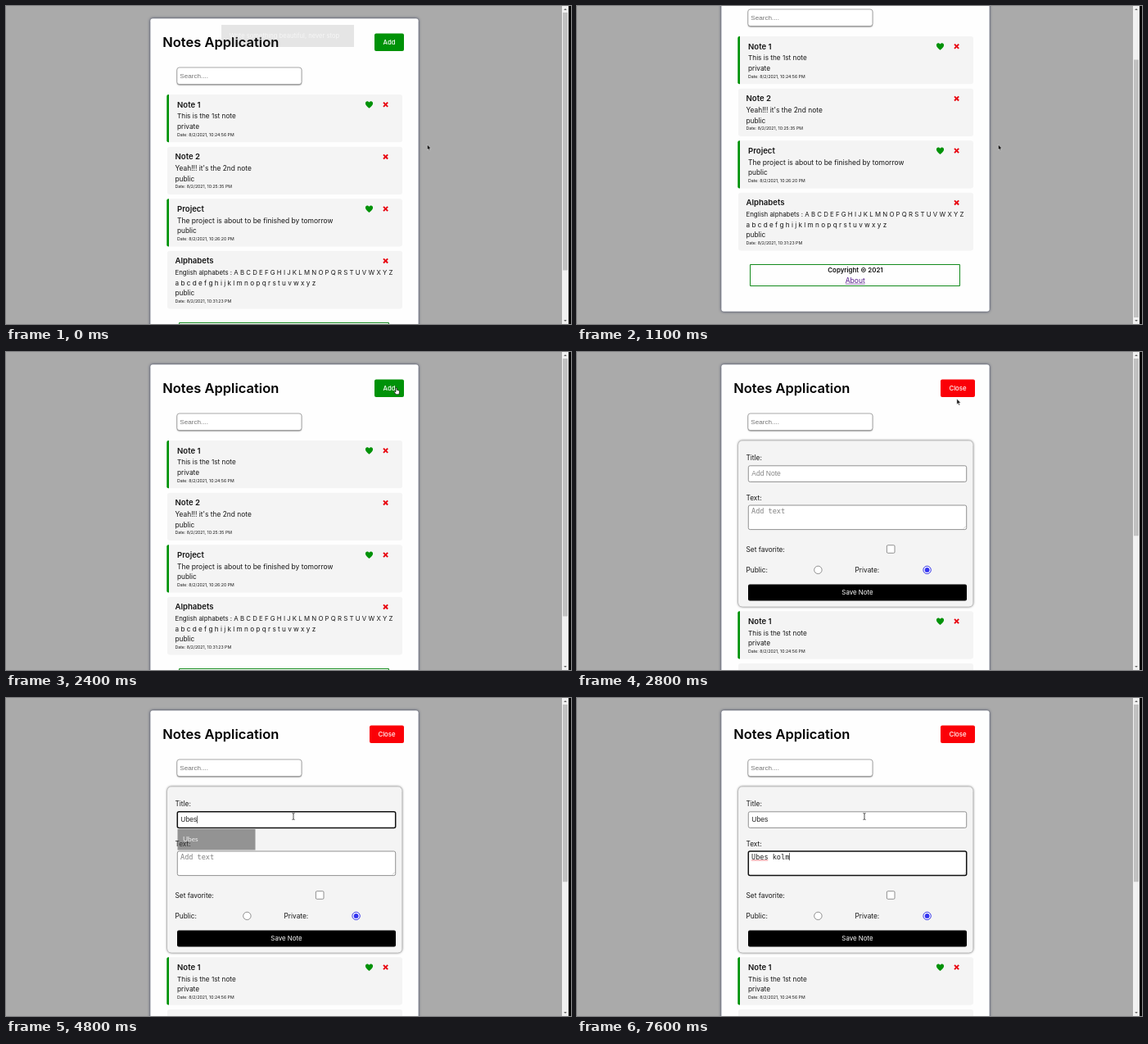
These frames come from a looping animation (690x388 px, 8 s). An HTML page with a canvas:

```html
<!DOCTYPE html>
<html lang="en">
<head>
<meta charset="utf-8">
<title>Notes Application</title>
<style>
  html, body { margin: 0; width: 100%; height: 100%; overflow: hidden; background: #aaa; }
  canvas { display: block; width: 100%; height: 100%; }
</style>
</head>
<body>
<canvas id="stage"></canvas>
<script>
const W = 690, H = 388, LOOP = 8000, TICK = 100;
const canvas = document.getElementById('stage');
const ctx = canvas.getContext('2d');
const dpr = window.devicePixelRatio || 1;
canvas.width = W * dpr;
canvas.height = H * dpr;

const UI = 'Inter, sans-serif';
const ARIAL = '"Liberation Sans", Arial, sans-serif';
const MONO = '"DejaVu Sans Mono", monospace';
const LATO = 'Lato, sans-serif';
const GREEN = '#009208', CARD = '#f4f4f4', GREY = '#777';

const PAGE = 459, FORM = 208.3;
const OPEN_AT = 2500, FOCUS_AT = 3300, MENU_AT = 3400, TAB_AT = 5900;
const SCROLL_AT = 800;
const SCROLL = [12, 36, 60, 71, 68, 64, 54, 38, 20];

const NOTES = [
  { y: 108, title: 'Note 1', lines: [['This is the 1st note', 8.2]], scope: 'private', time: '10:24:56', fav: true },
  { y: 171.7, title: 'Note 2', lines: [["Yeah!!! it's the 2nd note", 8.4]], scope: 'public', time: '10:25:35' },
  { y: 235.3, title: 'Project', lines: [['The project is about to be finished by tomorrow', 8.5]], scope: 'public', time: '10:26:20', fav: true },
  { y: 298.7, title: 'Alphabets', lines: [
    ['English alphabets : A B C D E F G H I J K L M N O P Q R S T U V W X Y Z', 7.85],
    ['a b c d e f g h i j k l m n o p q r s t u v w x y z', 8.2]], scope: 'public', time: '10:31:23' }
];

// [time, text typed so far]
const TITLE = [[0, ''], [4100, 'U'], [4500, 'Ub'], [4600, 'Ube'], [4700, 'Ubes']];
const BODY = [[0, ''], [6400, 'U'], [6500, 'Ub'], [6600, 'Ube'], [6700, 'Ubes'], [7200, 'Ubes '],
  [7400, 'Ubes k'], [7500, 'Ubes ko'], [7600, 'Ubes kolm']];
const typed = (steps, t) => steps.filter(s => s[0] <= t).pop()[1];

// [start, end, from x, from y, to x, to y]
const MOVES = [[1800, 2300, 514.4, 169, 477, 47], [2700, 3200, 477, 47, 351, 144.5]];

function text(str, x, y, size, opt = {}) {
  const { color = '#161616', weight = 400, font = UI, align = 'left' } = opt;
  ctx.font = `${weight} ${size}px ${font}`;
  ctx.textAlign = align;
  ctx.fillStyle = color;
  ctx.fillText(str, x, y + size * 0.36);
  return ctx.measureText(str).width;
}

function box(x, y, w, h, r, fill, stroke, line = 1) {
  ctx.beginPath();
  ctx.roundRect(x, y, w, h, r);
  if (fill) { ctx.fillStyle = fill; ctx.fill(); }
  if (stroke) { ctx.strokeStyle = stroke; ctx.lineWidth = line; ctx.stroke(); }
}

function shadowBox(color, blur, dy, ...shape) {
  ctx.save();
  ctx.shadowColor = color;
  ctx.shadowBlur = blur * dpr;
  ctx.shadowOffsetY = dy * dpr;
  box(...shape);
  ctx.restore();
}

function path(points, fill, stroke, line = 1) {
  ctx.beginPath();
  points.forEach(([x, y]) => ctx.lineTo(x, y));
  if (fill) { ctx.closePath(); ctx.fillStyle = fill; ctx.fill(); }
  if (stroke) { ctx.strokeStyle = stroke; ctx.lineWidth = line; ctx.stroke(); }
}

function circle(x, y, r, fill, stroke, line = 0.8) {
  box(x - r, y - r, 2 * r, 2 * r, r, fill, stroke, line);
}

function heart(x, y) {
  ctx.beginPath();
  ctx.moveTo(x, y + 4.3);
  ctx.bezierCurveTo(x - 2, y + 2.6, x - 4.6, y + 0.6, x - 4.6, y - 1.7);
  ctx.bezierCurveTo(x - 4.6, y - 4.6, x - 1.6, y - 5.1, x, y - 2.9);
  ctx.bezierCurveTo(x + 1.6, y - 5.1, x + 4.6, y - 4.6, x + 4.6, y - 1.7);
  ctx.bezierCurveTo(x + 4.6, y + 0.6, x + 2, y + 2.6, x, y + 4.3);
  ctx.fillStyle = GREEN;
  ctx.fill();
}

function cross(x, y) {
  for (const s of [1, -1]) path([[x - 2.6, y - 2.6 * s], [x + 2.6, y + 2.6 * s]], null, '#e8000c', 1.9);
}

function squiggle(x, y, w) {
  const pts = [];
  for (let i = 0; i <= w; i++) pts.push([x + i, y + (i % 2 ? 0.6 : -0.6)]);
  path(pts, null, '#e8404a', 0.6);
}

function caret(x, y) {
  ctx.fillStyle = '#111';
  ctx.fillRect(x, y - 4.6, 0.6, 9.2);
}

function note({ y, title, lines, scope, time, fav }) {
  const x = fav ? 209 : 206.5;
  const extra = (lines.length - 1) * 12.6;
  box(197, y, 287, 58.2 + extra, 3, CARD);
  if (fav) box(196.3, y, 2.7, 58.2, [2, 0, 0, 2], GREEN);
  text(title, x, y + 12.2, 9.6, { weight: 600 });
  lines.forEach(([str, size], i) => text(str, x, y + 26.3 + i * 12.6, size));
  text(scope, x, y + 39 + extra, 8.3);
  text(`Date: 8/2/2021, ${time} PM`, x, y + 48.9 + extra, 5.2);
  if (fav) heart(443.5, y + 12.4);
  cross(463.6, y + 12.2);
}

function button(label, x, y, w, h, color, size, weight) {
  box(x, y, w, h, 2, color);
  text(label, x + w / 2, y + h / 2, size, { color: '#fff', weight, align: 'center' });
}

function field(y, h, focused) {
  box(209.3, y, 266.4, h, 2, '#fff', focused ? '#101010' : GREY, focused ? 1.5 : 0.8);
}

function menu(t) {
  if (t < MENU_AT || t >= 4900) return;
  const fading = t >= 4800, single = t >= 4500;
  ctx.save();
  if (fading) {
    ctx.globalAlpha = 0.55;
    box(209.5, 160, 95, 25.5, 0, '#444');
    ctx.globalAlpha = 0.9;
    text('Ubes', 216, 172.5, 8.3, { color: '#fff', font: LATO });
  } else {
    shadowBox('rgba(0,0,0,.5)', 3, 1, 208.7, 160, 96.6, single ? 25.8 : 43.5, 0.5, '#404040');
    text('Ubes', 214.5, 172.5, 8.3, { color: '#fff', weight: 700, font: LATO });
    if (!single) text('ufk', 214.5, 190.3, 8.3, { color: '#fff', weight: 700, font: LATO });
  }
  ctx.restore();
}

function form(t) {
  const inTitle = t >= FOCUS_AT && t < TAB_AT, inBody = t >= TAB_AT;
  const title = typed(TITLE, t), body = typed(BODY, t);
  shadowBox('rgba(0,0,0,.75)', 3, 0, 197, 108.2, 286.6, 202.6, 5, CARD);

  text('Title:', 206.5, 129.3, 8.3);
  field(138.8, 19.6, inTitle);
  const font = { font: ARIAL, color: title ? '#222' : '#858585' };
  const tw = text(title || 'Add Note', 213.3, 148.4, 8.5, font);
  const blinkOff = (t >= 3800 && t < 4100) || t >= 5300;
  if (inTitle && !blinkOff) caret(213.3 + (title ? tw : 0), 148.3);
  if (inTitle && t >= 5700) squiggle(213.3, 153, 20);

  text('Text:', 206.5, 177.6, 8.3);
  field(187, 29.6, inBody);
  const bw = text(body || 'Add text', 213, 193.6, 8.55, { font: MONO, color: body ? '#222' : '#808080' });
  if (inBody) caret(213 + (body ? bw : 0), 193.6);
  if (t >= 7200) squiggle(213, 198, 20);
  path([[472, 215.5], [474.8, 212.7]], null, '#999', 0.5);

  text('Set favorite:', 206.5, 240.6, 8.3);
  box(378.4, 235.7, 9.6, 9.6, 1.3, '#fff', '#767676', 0.8);
  text('Public:', 206.5, 266, 8.3);
  circle(294.4, 265.9, 4.7, '#fff', '#767676');
  text('Private:', 339.5, 266, 8.3);
  circle(427.6, 265.9, 4.7, '#fff', '#3434e8', 1);
  circle(427.6, 265.9, 2.9, '#3434f0');
  button('Save Note', 209, 283.6, 267, 20, '#000', 7.9, 400);
  menu(t);
}

function footer() {
  box(211.5, 386.5, 256, 26, 0, null, '#138a1c', 1);
  text('Copyright © 2021', 340, 393.2, 7.9, { weight: 600, align: 'center' });
  const w = text('About', 339.7, 405.8, 8.5, { color: '#551a8b', align: 'center' });
  ctx.fillStyle = '#551a8b';
  ctx.fillRect(339.7 - w / 2, 409.8, w, 0.6);
}

function page(t) {
  const open = t >= OPEN_AT, shift = open ? FORM : 0;
  shadowBox('rgba(16,24,60,.9)', 3.5, 0, 176.3, 15.2, 327.4, 428.6 + shift, 3, '#fefefe');
  text('Notes Application', 191.3, 44.3, 16.5, { weight: 600, color: '#000' });
  if (open) button('Close', 444, 33.5, 42, 21.5, '#fb0007', 7.8, 500);
  else button('Add', 450, 33.5, 36, 21.5, GREEN, 7.7, 500);
  shadowBox('rgba(0,0,0,.5)', 1.5, 1, 208.8, 75, 152.2, 20.6, 3, '#fff');
  box(208.8, 75, 152.2, 20.6, 3, null, '#959595', 0.8);
  text('Search....', 212.3, 85.4, 8.1, { font: ARIAL, color: '#757575' });
  if (open) form(t);
  ctx.save();
  ctx.translate(0, shift);
  NOTES.forEach(note);
  footer();
  ctx.restore();
}

function toast(t) {
  const alpha = 1 - t / 400;
  if (alpha <= 0) return;
  ctx.save();
  ctx.globalAlpha = alpha;
  box(263, 23, 162, 27, 0, 'rgba(90,90,90,.15)');
  text('Write something beautiful, never stop', 340, 36.5, 7.6, { color: 'rgba(255,255,255,.65)', align: 'center' });
  ctx.restore();
}

function scrollbar(scroll, height) {
  ctx.fillStyle = '#f1f1f1';
  ctx.fillRect(679, 0, 8, H);
  const track = 372;
  ctx.fillStyle = '#c1c1c1';
  ctx.fillRect(680, 8 + track * scroll / height, 6, track * H / height);
  path([[681.2, 5], [683, 3], [684.8, 5]], '#606060');
  path([[681.2, 383], [683, 385], [684.8, 383]], '#606060');
  ctx.fillStyle = '#000';
  ctx.fillRect(687, 0, 3, H);
}

function pointerAt(t) {
  let pos = MOVES[0].slice(2, 4);
  for (const [start, end, x0, y0, x1, y1] of MOVES) {
    if (t < start) break;
    const p = Math.min(1, (t - start) / (end - start));
    const k = p * p * (3 - 2 * p);
    pos = [x0 + (x1 - x0) * k, y0 + (y1 - y0) * k];
  }
  return pos;
}

function pointer(t) {
  const [x, y] = pointerAt(t);
  const overButton = x > 444 && x < 486 && y > 33 && y < 56;
  const overField = t >= OPEN_AT && x < 476 && y > 138 && y < 159;
  ctx.save();
  ctx.translate(x, y);
  if (overField) {
    path([[-1.5, -4], [0, -3.4], [1.5, -4]], null, '#222', 0.8);
    path([[0, -3.4], [0, 3.4]], null, '#222', 0.8);
    path([[-1.5, 4], [0, 3.4], [1.5, 4]], null, '#222', 0.8);
  } else if (overButton) {
    const hand = [[-1, -3.5], [0.2, -3.5], [0.5, -0.6], [3, 0], [3.6, 1], [3, 4.8], [-0.8, 4.8], [-3, 1.6], [-2.4, 0.8], [-1, 1.8], [-1, -3.5]];
    path(hand, '#fff', '#111', 0.7);
  } else {
    const arrow = [[0, 0], [0, 6.6], [1.5, 5.3], [2.5, 7.8], [3.6, 7.3], [2.6, 4.9], [4.6, 4.8], [0, 0]];
    path(arrow, '#111', '#eee', 0.5);
  }
  ctx.restore();
}

function draw(t) {
  const scroll = SCROLL[(t - SCROLL_AT) / TICK] || 0;
  ctx.setTransform(dpr, 0, 0, dpr, 0, 0);
  ctx.fillStyle = '#aaa';
  ctx.fillRect(0, 0, W, H);
  ctx.save();
  ctx.translate(0, -scroll);
  page(t);
  ctx.restore();
  toast(t);
  scrollbar(scroll, t >= OPEN_AT ? PAGE + FORM : PAGE);
  pointer(t);
}

const begin = performance.now();
function loop() {
  const t = (performance.now() - begin) % LOOP;
  draw(Math.floor(t / TICK) * TICK);
  requestAnimationFrame(loop);
}
loop();
</script>
</body>
</html>
```
